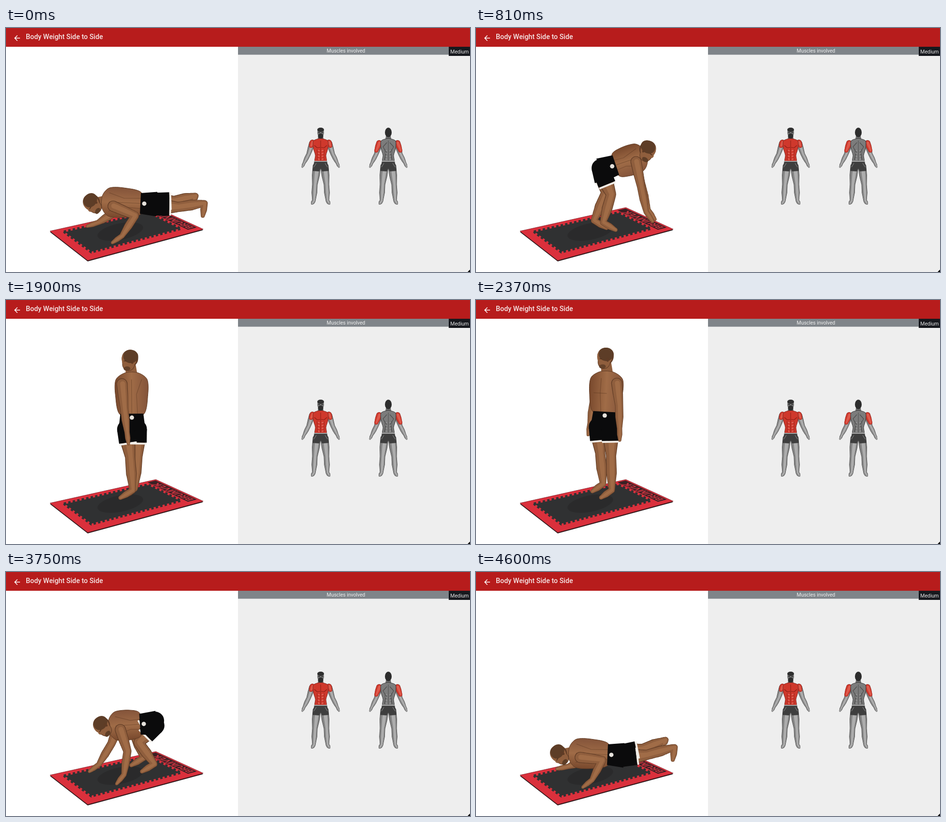
Recreate the animation shown at these times as an HTML page with a canvas. Size 960 px wide and 507 px high, loop 4.67 s.

```html
<!DOCTYPE html>
<html lang="en">
<head>
<meta charset="utf-8">
<title>Body Weight Side to Side</title>
<style>
  html, body { margin: 0; width: 100%; height: 100%; overflow: hidden; background: #fff; }
  canvas, svg { position: absolute; left: 0; top: 0; display: block; }
  text { font-family: Roboto, "Open Sans", sans-serif; }
</style>
</head>
<body>
<canvas id="stage" width="960" height="507"></canvas>
<svg width="960" height="507" viewBox="0 0 960 507">
  <rect width="960" height="39" fill="#b71c1c"/>
  <path transform="translate(14 12) scale(.75)" fill="#fff" d="M20 11H7.83l5.59-5.59L12 4l-8 8 8 8 1.41-1.41L7.83 13H20z"/>
  <text x="41" y="23.3" font-size="14.3" font-weight="500" fill="#f6e8e8">Body Weight Side to Side</text>
  <rect x="480" y="39" width="480" height="16.5" fill="#7f8489"/>
  <text x="663.6" y="51" font-size="10.4" fill="#f0f0f0">Muscles involved</text>
  <rect x="916" y="39" width="44" height="19" fill="#17191e"/>
  <text x="919.3" y="53" font-size="10.5" fill="#e4e4e4">Medium</text>
  <path d="M955 507l5-5v5z"/>
</svg>
<script>
const ctx = document.getElementById('stage').getContext('2d');
const LOOP = 4670, PICTURES = 61;
const SKIN = ['#5f3b25', '#8f5e3d', '#a06c47'];
const GREY = ['#363636', '#838383', '#adadad'];
const RED = ['#7d2620', '#cf382c', '#dd5a4c'];
// Radii at each joint and halfway between joints.
const ARM = [11.5, 10.5, 8.5, 8.5, 5.5, 5.5, 3];
const LEG = [16, 15, 10.5, 11, 6.5, 7, 4];

// Key points on screen; yaw 0 shows the back, 90 faces left. bend: elbow, knee. kick: foot off the mat.
const plank = {
  head: [180, 364], chest: [224, 362], hips: [310, 366],
  handL: [240, 432], handR: [191, 404], footL: [411, 364], footR: [392, 349],
  bend: [38, -4], yaw: [78], kick: [1]
};
const crouch = {
  head: [201, 320], chest: [238, 319], hips: [309, 314],
  handL: [244, 421], handR: [192, 400], footL: [307, 399], footR: [285, 386],
  bend: [11, -34], yaw: [78], kick: [0]
};
const touch = {
  head: [353, 255], chest: [327, 272], hips: [259, 295],
  handL: [356, 378], handR: [352, 382], footL: [244, 400], footR: [263, 404],
  bend: [0, 18], yaw: [-80], kick: [0]
};
const rear = {
  head: [247, 129], chest: [251, 178], hips: [257, 272],
  handL: [211, 281], handR: [293, 256], footL: [246, 396], footR: [269, 400],
  bend: [-3, 4], yaw: [8], kick: [0]
};
const stand = {
  head: [268, 121], chest: [270, 174], hips: [265, 264],
  handL: [297, 267], handR: [236, 256], footL: [281, 395], footR: [263, 382],
  bend: [2, 0], yaw: [122], kick: [0]
};
const sink = {
  head: [286, 131], chest: [291, 182], hips: [274, 273],
  handL: [303, 276], handR: [250, 264], footL: [301, 402], footR: [266, 386],
  bend: [8, -4], yaw: [122], kick: [0]
};

// Moves the trunk while hands and feet stay planted.
function lift(pose, dx, dy) {
  const out = { ...pose };
  for (const k of ['head', 'chest', 'hips']) out[k] = [pose[k][0] + dx, pose[k][1] + dy];
  return out;
}

const KEYS = [
  [0, plank], [190, lift(plank, 3, -26)], [430, crouch], [580, lift(crouch, 4, -18)],
  [765, touch], [1150, rear], [1360, rear], [2370, stand], [2700, stand],
  [3140, sink], [3340, sink], [3750, crouch], [3900, crouch],
  [4220, lift(plank, 3, -20)], [4594, lift(plank, -6, 15)], [LOOP, plank]
];

const lerp = (a, b, k) => a + (b - a) * k;
const mix = (a, b, k) => a.map((n, i) => lerp(n, b[i], k));
const add = (a, b, k = 1) => [a[0] + b[0] * k, a[1] + b[1] * k];
const unit = (a, b) => {
  const d = add(b, a, -1), len = Math.hypot(...d) || 1;
  return [d[0] / len, d[1] / len];
};

function poseAt(t) {
  const i = Math.max(1, KEYS.findIndex(key => key[0] > t));
  const [t0, p] = KEYS[i - 1], [t1, q] = KEYS[i];
  const k = (t - t0) / (t1 - t0), out = {};
  for (const part in p) out[part] = mix(p[part], q[part], k * k * (3 - 2 * k));
  return out;
}

function ellipse([x, y], rx, ry, fill, rot = 0) {
  ctx.beginPath();
  ctx.ellipse(x, y, rx, ry, rot, 0, 7);
  ctx.fillStyle = fill;
  ctx.fill();
}

function line(pts, color, width) {
  ctx.beginPath();
  pts.forEach(p => ctx.lineTo(...p));
  ctx.strokeStyle = color;
  ctx.lineWidth = width;
  ctx.stroke();
}

function poly(pts, fill) {
  ctx.beginPath();
  pts.forEach(p => ctx.lineTo(...p));
  ctx.closePath();
  ctx.fillStyle = fill;
  ctx.fill();
}

// Closed curve through all points.
function shape(pts, fill, stroke) {
  const at = i => pts[(i + pts.length) % pts.length];
  const pull = (i, k) => add(at(i), add(at(i + 1), at(i - 1), -1), k / 7);
  ctx.beginPath();
  ctx.moveTo(...at(0));
  pts.forEach((_, i) => ctx.bezierCurveTo(...pull(i, 1), ...pull(i + 1, -1), ...at(i + 1)));
  ctx.fillStyle = fill;
  ctx.fill();
  ctx.strokeStyle = stroke;
  ctx.lineWidth = 1;
  ctx.stroke();
}

// Rounded limb through its joints with changing radius.
function blob(pts, radii, fill, grow = 1, off = 0) {
  const along = (list, s) => {
    const i = Math.min(s | 0, list.length - 2);
    return [list[i], list[i + 1], s - i];
  };
  ctx.beginPath();
  for (let k = 0; k <= 1; k += .01) {
    const r = lerp(...along(radii, k * (radii.length - 1))) * grow;
    const [x, y] = add(mix(...along(pts, k * (pts.length - 1))), [1, -.4], off * r);
    ctx.moveTo(x + r, y);
    ctx.arc(x, y, r, 0, 7);
  }
  ctx.fillStyle = fill;
  ctx.fill();
}

function limb(pts, radii, tone) {
  blob(pts, radii, tone[0]);
  blob(pts, radii, tone[1], .9);
  blob(pts, radii, tone[2], .45, .25);
}

const onMat = (u, v) => [
  lerp(lerp(91, 310, u), lerp(169, 408, u), v),
  lerp(lerp(422, 373, u), lerp(483, 418, u), v)
];
const matRect = (u0, v0, u1, v1) => [onMat(u0, v0), onMat(u1, v0), onMat(u1, v1), onMat(u0, v1)];

function drawMat() {
  const rim = matRect(0, 0, 1, 1);
  poly(rim.map(p => add(p, [0, 2])), '#241416');
  poly(rim, '#da303c');
  line([...rim, rim[0]], '#7c2029', .8);
  poly(matRect(.1, .115, .875, .8), '#303132');
  const edge = matRect(.094, .1, .882, .815);
  ctx.setLineDash([5, 4.5]);
  line([...edge, edge[0]], '#303132', 5);
  ctx.setLineDash([]);
  ellipse(onMat(.48, .46), 48, 17, '#2a2a2b', -.2);
  poly(matRect(.908, .03, .985, .9), '#3a2024');
  ctx.save();
  ctx.transform(-.91, -.415, .964, -.262, ...onMat(.974, .88));
  ctx.font = 'bold 18px Roboto, sans-serif';
  ctx.fillStyle = '#c63540';
  ctx.fillText('BRUMVEK', 0, 0);
  ctx.restore();
}

function drawHead(at, tilt, face) {
  const side = Math.abs(face);
  ctx.save();
  ctx.translate(...at);
  ctx.rotate(tilt);
  ellipse([0, -4], 17, 18, SKIN[0]);
  ellipse([face * 4, 8], 13, 14, SKIN[0]);
  ellipse([face * 2, -3], 15.5, 16.5, SKIN[1]);
  ellipse([face * 4, 8], 12, 13, SKIN[1]);
  ellipse([-face * 2, -8], 15.5, 19 - 6 * side, '#5d3d27');
  ctx.globalAlpha = side;
  ellipse([face * 16.5, 3], 2.5, 3.5, SKIN[1]);
  ellipse([face * 8, 17], 7, 4.5, '#5d3d27');
  line([[face * 9, 1], [face * 15, 1]], '#4a2e1c', 1.5);
  ctx.globalAlpha = 1;
  ellipse([-face * 5, 3], 2.5, 4.5, SKIN[0]);
  ctx.restore();
}

function drawTorso(body, p, wide, waist, front) {
  const rows = [[p.chest, 25, 13], [p.chest, 11, wide * .96], [p.chest, -20, wide], [p.hips, 30, waist]];
  const at = (u, r) => body(rows[r][0], rows[r][1], rows[r][2] * u);
  const shade = ctx.createLinearGradient(...at(-1, 2), ...at(1, 2));
  shade.addColorStop(0, '#79492d');
  shade.addColorStop(.5, SKIN[2]);
  shade.addColorStop(1, '#84543a');
  shape([0, 1, 2, 3].map(r => at(-1, r)).concat([3, 2, 1, 0].map(r => at(1, r))), shade, SKIN[0]);
  const ink = 'rgba(80,48,28,.4)', mid = front ? -.35 : 0;
  line([at(mid, 1), at(mid, 2), at(mid, 3)], ink, 1.3);
  for (const s of [-1, 1])
    line(front ? [at(mid, 2), at(mid + s * .4, 2)] : [at(s * .65, 1), at(s * .3, 2), at(s * .5, 3)], ink, 1.2);
}

function drawShorts(body, hips, waist, legs, back) {
  const black = '#0b0b0c';
  for (const [hip, knee] of legs) {
    const dir = unit(hip, knee), hem = add(hip, dir, 28);
    line([hem, add(hem, dir, 4)], '#f2eee8', 36);
    line([hip, hem], black, 37);
    ellipse(hip, 18.5, 18.5, black);
  }
  poly([body(hips, 32, -waist), body(hips, -2, -waist - 4), body(hips, -2, waist + 4), body(hips, 32, waist)], black);
  const label = body(hips, 24, 0);
  ctx.globalAlpha = 1 - back;
  ellipse(label, 4.5, 4.5, '#e6e2dc');
  ctx.globalAlpha = back;
  ctx.font = 'bold 5.5px Roboto, sans-serif';
  ctx.textAlign = 'center';
  ctx.fillStyle = '#eee';
  ctx.fillText('BRUMVEK METHOD', ...label);
  ctx.textAlign = 'left';
  ctx.globalAlpha = 1;
}

function drawFigure(p) {
  const yaw = p.yaw[0] * Math.PI / 180, c = Math.cos(yaw), s = Math.sin(yaw);
  const up = unit(p.hips, p.chest), right = [-up[1], up[0]];
  const body = (from, along, across) => add(add(from, up, along), right, across);
  const wide = Math.hypot(43 * c, 30 * s), waist = Math.hypot(31 * c, 21 * s);
  const sides = s > -.3 ? ['R', 'L'] : ['L', 'R'];

  const joint = (a, b, k, bend) => {
    const [dx, dy] = unit(a, b);
    return add(mix(a, b, k), [dy, -dx], bend);
  };
  const arm = (side, far) => {
    const hand = p['hand' + side], root = body(p.chest, 2, (side === 'L' ? -40 : 40) * c);
    const elbow = joint(root, hand, .49, p.bend[0] * (far ? .4 : 1));
    const flat = -s * (1 - Math.abs(up[1])) * .7;
    const dir = unit([0, 0], add(unit(elbow, hand), [flat, 0]));
    return [root, elbow, hand, add(hand, dir, 25)];
  };
  const leg = (side, far) => {
    const sign = side === 'L' ? -1 : 1, foot = p['foot' + side];
    const root = body(p.hips, 0, 25 * c * sign);
    const step = [-s * 27 + 14 * sign * Math.max(0, c - .3), 16];
    return [root, joint(root, foot, .45, p.bend[1]), foot, add(foot, mix(step, [-4, far ? 8 : 27], p.kick[0]))];
  };

  const legs = sides.map((side, i) => leg(side, !i));
  limb(arm(sides[0], true), ARM, SKIN);
  legs.forEach(l => limb(l, LEG, SKIN));
  blob([body(p.chest, 22, 0), p.head], [12, 10], SKIN[1]);
  drawTorso(body, p, wide, waist, c < -.2);
  drawShorts(body, p.hips, waist, legs, Math.max(0, c * 2 - 1));
  limb(arm(sides[1], false), ARM, SKIN);
  const [hx, hy] = unit(p.chest, p.head);
  drawHead(p.head, Math.atan2(hx, -hy) * .6, -s);
}

function drawModel(x, back) {
  const both = fn => [-1, 1].forEach(fn);
  ctx.save();
  ctx.translate(x, 0);
  both(s => {
    limb([[s * 8, 288], [s * 12, 325], [s * 14, 359], [s * 18, 365]], LEG.map(r => r * .53), GREY);
    limb([[s * 18, 240], [s * 25, 262], [s * 34, 280], [s * 38, 289]], ARM.map(r => r * .53), GREY);
    limb(back ? [[s * 19, 239], [s * 25, 255]] : [[s * 17, 238], [s * 20, 245]], [6, 5.5, 4], RED);
  });
  blob([[0, 222], [0, 236]], [4.5, 7], '#6c6c6c');
  const half = [[4, 230], [15, 235], [15, 250], [11, 264], [11, 278]];
  const outline = [...half.map(([a, y]) => [-a, y]), ...half.reverse()];
  shape(outline, back ? '#7c7c7c' : RED[1], back ? GREY[0] : RED[0]);
  const ink = back ? 'rgba(40,40,40,.55)' : 'rgba(110,20,14,.7)';
  line([[0, 234], [0, 276]], ink, 1);
  both(s => {
    line(back ? [[s * 3, 238], [s * 11, 247], [s * 4, 258], [s * 8, 274]]
      : [[s, 248], [s * 7, 249], [s * 13, 244]], ink, 1.2);
    for (let y = 255; y < 274; y += 6) line([[s * 2, y], [s * 6, y - 1]], back ? '#a2a2a2' : '#e98d80', 1.2);
    line([[s * 7, 252], [s * 7, 275]], ink, .8);
  });
  poly([[-13, 276], [-17, 297], [-3, 298], [0, 291], [3, 298], [17, 297], [13, 276]], '#3e3e3e');
  line([[-13, 277], [13, 277]], '#a5a5a5', 2);
  both(s => line([[s * 9, 281], [s * 14, 289]], '#8e8e8e', 1));
  ellipse([0, 217], 7, 10, back ? '#2d2d2d' : '#777');
  if (!back) {
    ellipse([0, 211.5], 7, 4.5, '#303030');
    ellipse([0, 224.5], 5.5, 5.5, '#2d2d2d');
    both(s => line([[s * 5, 217], [s * 1.5, 217.5]], '#252525', 1.4));
  }
  ctx.restore();
}

ctx.lineJoin = 'round';
ctx.fillStyle = '#eee';
ctx.fillRect(480, 39, 480, 468);
drawModel(651, false);
drawModel(791, true);

const start = performance.now(), hold = LOOP / PICTURES;
let shown = -1;
function tick() {
  const t = (performance.now() - start) % LOOP;
  const i = Math.floor((t + 10) / hold) % PICTURES;
  if (i !== shown) {
    shown = i;
    ctx.fillStyle = '#fff';
    ctx.fillRect(0, 39, 480, 468);
    drawMat();
    drawFigure(poseAt(i * hold));
  }
  requestAnimationFrame(tick);
}
tick();
</script>
</body>
</html>
```
